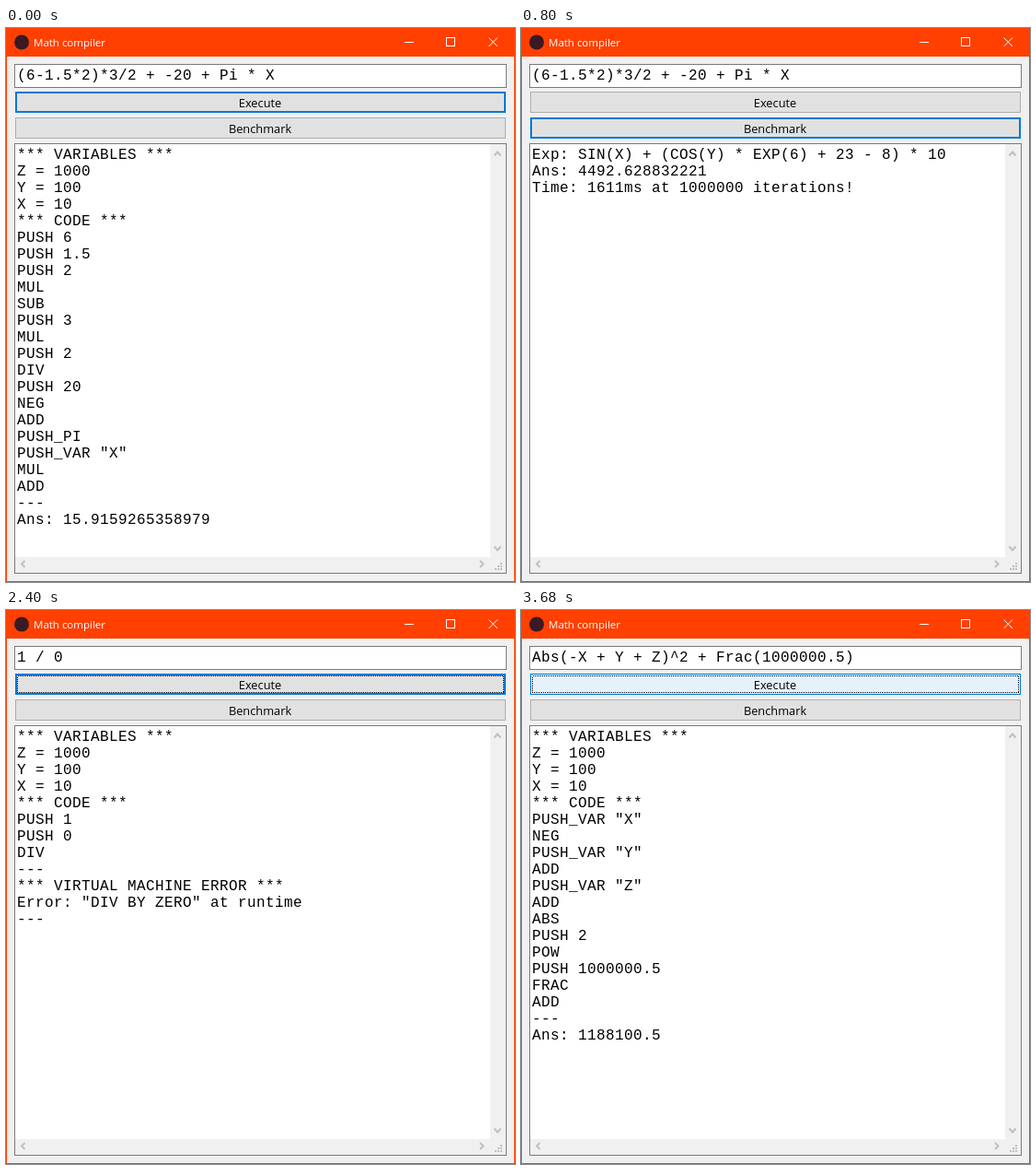
Write an HTML page that moves like this. It is 553 px wide and 601 px high and loops after 4 s.

```html
<!DOCTYPE html>
<html lang="en">
<head>
<meta charset="utf-8">
<title>Math compiler</title>
<style>
  html, body { margin: 0; width: 100%; height: 100%; overflow: hidden; background: #f0f0f0; }
  svg { display: block; }
  text { white-space: pre; }
  .mono { font: 16px "Liberation Mono", "Courier New", monospace; letter-spacing: .398px; }
  .ui { font: 12.8px "Open Sans", "Noto Sans", sans-serif; text-anchor: middle; }
  .title { font: 11.5px "Open Sans", "Noto Sans", sans-serif; fill: #fff; }
  .crisp { shape-rendering: crispEdges; }
  .line { fill: none; stroke: #fff; }
  .arrow { fill: none; stroke: #bfbfbf; stroke-width: 2; }
  .focus { fill: none; stroke: #000; stroke-dasharray: 1 1; }
</style>
</head>
<body>
<svg width="553" height="601" viewBox="0 0 553 601">
  <rect width="553" height="601" fill="#ff4000"/>
  <rect x="1" y="31" width="551" height="569" fill="#f0f0f0"/>

  <circle cx="17" cy="15.5" r="8" fill="#3a1a24"/>
  <text class="title" x="30" y="20">Math compiler</text>
  <path class="line crisp" d="M433 15.5h10M478.5 10.5h9v9h-9z"/>
  <path class="line" d="M524.5 10.5l9.5 9.5M534 10.5l-9.5 9.5"/>

  <rect class="crisp" x="9.5" y="39.5" width="534" height="25" fill="#fff" stroke="#7a7a7a"/>
  <text id="input" class="mono" x="12" y="56"></text>

  <g id="buttons"></g>

  <rect class="crisp" x="9.5" y="125.5" width="534" height="466" fill="#fff" stroke="#7a7a7a"/>
  <path class="crisp" d="M526 126h17v465H10v-17h516z" fill="#f0f0f0"/>
  <path class="arrow" d="M530.5 138.5l3.5-4l3.5 4M530.5 562.5l3.5 4l3.5-4M20.5 578l-3.5 3.5l3.5 3.5M515 578l3.5 3.5l-3.5 3.5"/>
  <path class="crisp" d="M537 580h2v2h-2zM534 583h2v2h-2zM537 583h2v2h-2zM531 586h2v2h-2zM534 586h2v2h-2zM537 586h2v2h-2z" fill="#bfbfbf"/>
  <g id="memo" class="mono"></g>
</svg>
<script>
const NS = "http://www.w3.org/2000/svg";
const STEP = 800;
const $ = id => document.getElementById(id);

function add(parent, tag, attrs, text = "") {
  const el = document.createElementNS(NS, tag);
  for (const key in attrs) el.setAttribute(key, attrs[key]);
  el.textContent = text;
  parent.append(el);
  return el;
}

const vars = "*** VARIABLES ***|Z = 1000|Y = 100|X = 10|*** CODE ***|";
const sum = "(6-1.5*2)*3/2 + -20 + Pi * X";

// execute / benchmark: style of each button
const scenes = [
  { input: sum, execute: "default", benchmark: "normal",
    memo: vars + 'PUSH 6|PUSH 1.5|PUSH 2|MUL|SUB|PUSH 3|MUL|PUSH 2|DIV|PUSH 20|NEG|ADD|PUSH_PI|PUSH_VAR "X"|MUL|ADD|---|Ans: 15.9159265358979' },
  { input: sum, execute: "normal", benchmark: "default",
    memo: "Exp: SIN(X) + (COS(Y) * EXP(6) + 23 - 8) * 10|Ans: 4492.628832221|Time: 1611ms at 1000000 iterations!" },
  { input: "1 + 3 * (3 * * 3 + 2)", execute: "focused", benchmark: "normal",
    memo: "*** COMPILE ERROR ***|" + "0123456789".repeat(4) + "|1 + 3 * (3 * * 3 + 2)_|" + " ".repeat(13) + '^|Error: "Primitive expected" at 13|---' },
  { input: "1 / 0", execute: "focused", benchmark: "normal",
    memo: vars + 'PUSH 1|PUSH 0|DIV|---|*** VIRTUAL MACHINE ERROR ***|Error: "DIV BY ZERO" at runtime|---' },
  { input: "Abs(-X + Y + Z)^2 + Frac(1000000.5)", execute: "hover", benchmark: "normal",
    memo: vars + 'PUSH_VAR "X"|NEG|PUSH_VAR "Y"|ADD|PUSH_VAR "Z"|ADD|ABS|PUSH 2|POW|PUSH 1000000.5|FRAC|ADD|---|Ans: 1188100.5' }
];

const styles = {
  normal:  { edge: "#adadad", width: 1, fill: "#e1e1e1", dots: false },
  default: { edge: "#0078d7", width: 2, fill: "#e1e1e1", dots: false },
  focused: { edge: "#0078d7", width: 2, fill: "#e1e1e1", dots: true },
  hover:   { edge: "#0078d7", width: 1, fill: "#e5f1fb", dots: true }
};

function makeButton(label, y) {
  const group = $("buttons");
  const edge = add(group, "rect", { class: "crisp", x: 10, y, width: 533, height: 23 });
  const face = add(group, "rect", { class: "crisp" });
  const dots = add(group, "rect", { class: "focus crisp", x: 12.5, y: y + 2.5, width: 528, height: 18 });
  add(group, "text", { class: "ui", x: 276, y: y + 17 }, label);
  return name => {
    const s = styles[name], w = s.width;
    edge.setAttribute("fill", s.edge);
    face.setAttribute("x", 10 + w);
    face.setAttribute("y", y + w);
    face.setAttribute("width", 533 - 2 * w);
    face.setAttribute("height", 23 - 2 * w);
    face.setAttribute("fill", s.fill);
    dots.setAttribute("visibility", s.dots ? "visible" : "hidden");
  };
}

const setExecute = makeButton("Execute", 69);
const setBenchmark = makeButton("Benchmark", 97);
let shown = -1;

function draw(time) {
  const index = Math.floor(time / STEP) % scenes.length;
  if (index === shown) return;
  shown = index;
  const scene = scenes[index];
  $("input").textContent = scene.input;
  setExecute(scene.execute);
  setBenchmark(scene.benchmark);
  $("memo").replaceChildren();
  scene.memo.split("|").forEach((line, i) =>
    add($("memo"), "text", { x: 12, y: 142 + 18 * i }, line));
}

let start = null;
function tick(now) {
  if (start === null) start = now;
  draw(Math.max(0, now - start));
  requestAnimationFrame(tick);
}
draw(0);
requestAnimationFrame(tick);
</script>
</body>
</html>
```
